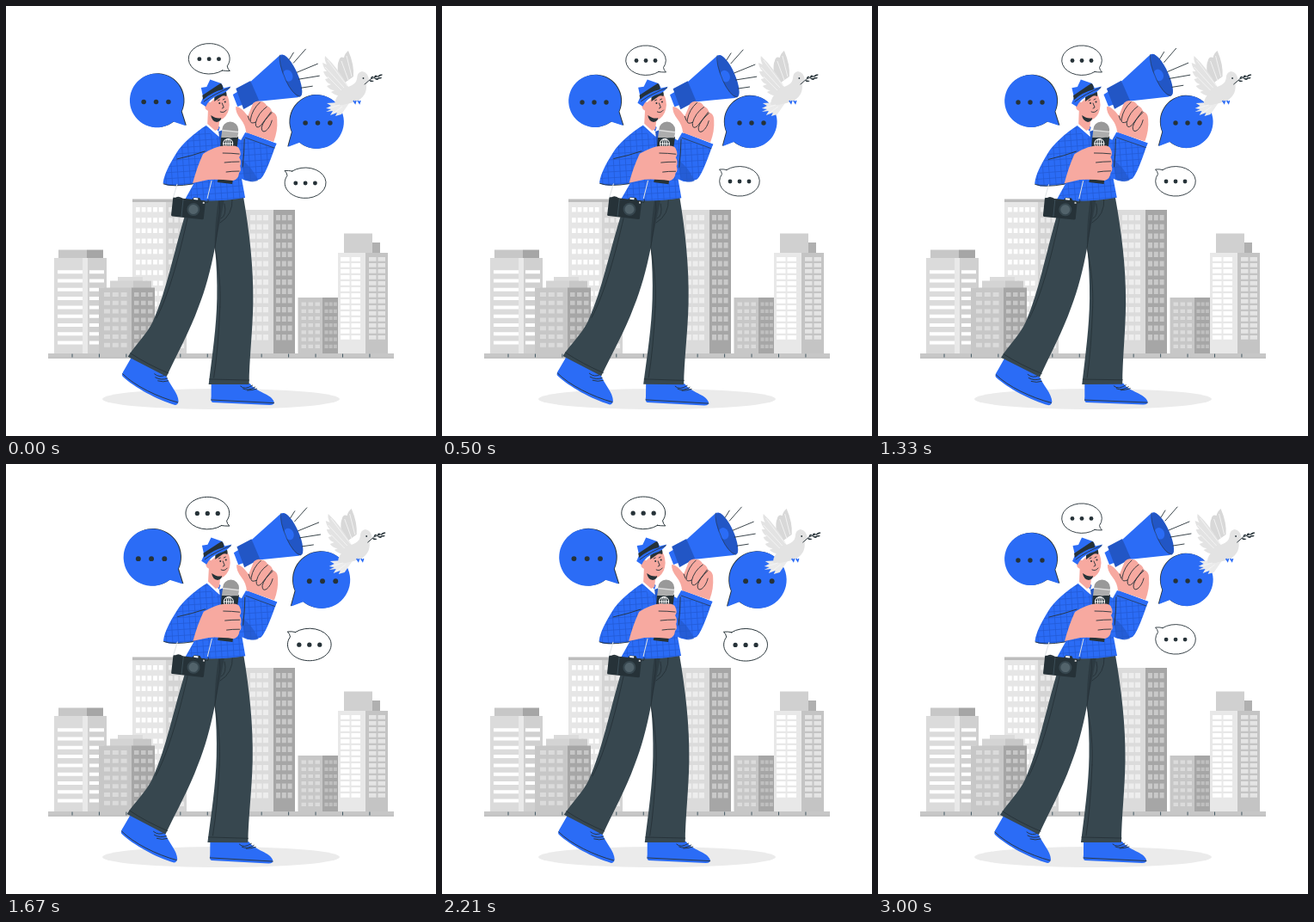
Write an HTML page that moves like this. It is 500x500 px and loops after 3040 ms.

```html
<!DOCTYPE html>
<html lang="en">
<head>
<meta charset="utf-8">
<title>Reporter with megaphone</title>
<style>
html, body { margin: 0; height: 100%; overflow: hidden; background: #fff }
svg { display: block; width: 100vw; height: 100vh }
.ink { fill: none; stroke: #263238; stroke-width: .9; stroke-linecap: round; stroke-linejoin: round }
.blue { fill: #2b6cf6 }
.navy { fill: #2256c5 }
.dark { fill: #263238 }
.skin { fill: #f7a9a0 }
</style>
</head>
<body>
<svg viewBox="0 0 500 500">
  <defs>
    <pattern id="plaid" width="7" height="7" patternUnits="userSpaceOnUse" patternTransform="rotate(-4)">
      <rect width="7" height="7" fill="#2b6cf6"/>
      <path d="M0 3.5H7M3.5 0V7" stroke="#225bd6" stroke-width=".8"/>
    </pattern>
  </defs>
  <g id="city"></g>
  <ellipse cx="250" cy="457" rx="138" ry="12" fill="#ebebeb"/>
  <g id="bubbles"></g>

  <g id="bird" fill="#e3e3e3">
    <path d="M404 82Q405 68 398 52Q394 55 393 60Q388 58 387 64Q385 67 386 78L390 92Z" fill="#d8d8d8"/>
    <path d="M388 112L373 113L378 116L372 119L378 120L372 123L380 122L377 127L385 124L383 128L390 126L399 113Z" fill="#ebebeb"/>
    <path d="M398 94Q386 72 371 58Q370 63 373 68L368 66Q369 72 373 76L369 76Q371 82 375 84L371 85Q373 90 378 91L373 93Q377 98 382 98L378 100Q383 104 386 104Q381 111 383 115Q393 116 407 111Q420 105 419 92L422 86Q421 77 414 76Q408 77 408 85Q407 91 398 94Z"/>
    <path d="M397 93L374 63M393 95L371 71M390 98L374 82M402 82L396 58M398 86L390 64M388 115L375 119M391 117L380 125" fill="none" stroke="#f5f5f5" stroke-width=".9"/>
    <path d="M404 110l2 3 1-3M409 110l2 3 1-3" fill="none" stroke="#2b6cf6" stroke-width="1.500"/>
    <circle cx="415.500" cy="84" r=".9" class="dark"/>
    <path d="M417 91L424 85L437 80" class="ink"/>
    <path d="M424 85Q424 81 428 82ZM428 84Q428 79 432 81ZM428 84Q432 88 434 84ZM432 83Q434 78 438 80ZM432 83Q436 86 437 83ZM422 86Q424 90 428 87Z" class="dark"/>
  </g>

  <g id="man">
    <!-- shoes -->
    <path class="blue" d="M146 409L186 429C190 440 201 450 201 460Q200 464 197 464C176 458 150 444 136 431Q134 429 138 423Z"/>
    <path class="blue" d="M239 439H284C291 449 309 451 312 460Q313 464 307 464L241 461Q238 461 239 454Z"/>
    <path class="ink" d="M136 428C150 442 177 455 200 461M239 458L312 461.500"/>
    <path class="ink" stroke-width="1.500" d="M173 428Q179 433 186 429M174 432Q181 436 188 433M177 436Q183 438 189 436M273 442Q278 447 287 441M276 445Q282 448 290 443M281 447Q286 447 292 445"/>
    <!-- trousers -->
    <path fill="#37474f" d="M210 228L276 222C283 262 288 303 287.500 345C287 380 283 412 283 440H236C240 407 245 373 245.500 340Q246 310 243 281C238 307 232 330 224 350C214 378 199 405 187 431L142 408C151 394 164 382 171 367C187 331 195 286 209 240Z"/>
    <path class="ink" d="M145 404Q165 417 189 427M237 434L283 435M211 247C203 284 190 336 175 363M248 227Q250 238 247 250L243 281C248 305 250 331 249 350M263 224Q264 243 249 252M254 230Q257 244 250 247M249 350Q247 400 242 432"/>
    <path d="M247 224L254 224L246 265L243 281Q242 260 247 224Z" class="dark" opacity=".55"/>
    <!-- shirt -->
    <path fill="url(#plaid)" d="M234 138C218 148 204 161 198 171C190 184 184 195 182.500 206Q186 210 197 209L218 207L208 225Q241 229 278 223L274 201Q284 207 296 201Q302 196 314 160L278 147L273 156L247 140Z"/>
    <path d="M273 178L277 200Q284 207 293 203Q287 188 273 178Z" class="navy" opacity=".65"/>
    <path class="ink" d="M199 178Q217 174 231 169M277 154Q277 171 275 187M218 206L221 195M183 207Q194 211 217 207"/>
    <path d="M276 154L280 147L314.500 160L312 165Z" class="blue"/>
    <path d="M278 153L312 165" class="ink" style="stroke-width:.7"/>
    <path d="M231 137.500L236 134L247 146L250 136L254 140L252 154L246 151Z" fill="#fff"/>
    <path d="M232 139L246 151L243 156Z" class="blue"/>
    <path d="M247 146L252 144L254 158L249 164Z" class="navy"/>
    <!-- head -->
    <path class="skin" d="M235 114L253 99Q259 104 259.500 115Q259 126 252 131L248 133L247 143L243 145L234 137Z"/>
    <path d="M238 127Q245 132 250 130Q250 134 245 135Q239 134 238 127ZM242 106L254 98Q257 100 256 105Q252 103 249 106L242 111Z" class="dark"/>
    <path class="skin" d="M237 112Q231 110 231 116Q231 122 237 122Z"/>
    <path class="blue" d="M226.500 95L233 94L237 85.500L250 90L253 95.500L261 93.500Q257 101 246 104Q236 108 232 117L226 113L229 106Z"/>
    <path d="M228 104L249 90Q252 91 252 97Q239 100 229 109Z" class="dark"/>
    <path class="ink" d="M230 111Q242 102 260 95M246 110l2-1M252 109l2-1M251 113l2 5-2 1M249 123Q253 125 256 121"/>
    <circle cx="248" cy="113" r="1" class="dark"/><circle cx="254.500" cy="111.500" r="1" class="dark"/>
    <!-- microphone and lower hand -->
    <path d="M250 151L270 152L263 207L246 205Z" class="dark"/>
    <circle cx="260.500" cy="144" r="9.500" fill="#999"/>
    <path d="M251 145L270 147L269 153H250Z" fill="#adadad"/>
    <path d="M251 144.500L270 146.500" stroke="#ddd" stroke-width="1.400"/>
    <g fill="none" stroke="#fff" stroke-width="1"><circle cx="258" cy="160" r="5.500"/><ellipse cx="258" cy="160" rx="2.500" ry="5.500"/><path d="M252 160H264M258 154V166"/></g>
    <path class="skin" d="M229 172C237 167 250 161 258 163Q269 161 271 166Q274 172 271 176Q274 181 272 186Q274 191 271 194Q270 202 264 203Q246 201 235 202L217 206Q222 187 229 172Z"/>
    <path class="ink" d="M271 172Q262 171 252 171M271 181Q262 181 254 182M271 192Q262 192 256 193M246 204L258 205"/>
    <!-- megaphone -->
    <path class="blue" d="M263.500 103L270 99L277 114L269 117Z"/>
    <path class="blue" d="M284 88L318 57Q324 53 334 72Q345 94 343.500 103L339 106L292 111Z"/>
    <path class="navy" d="M267 96L284 87L294 110L276 120Z"/>
    <ellipse cx="331" cy="81" rx="8" ry="26.500" transform="rotate(-24 331 81)" class="navy"/>
    <ellipse cx="327.500" cy="81" rx="5.500" ry="7" transform="rotate(-24 327 81)" class="blue"/>
    <path class="ink" d="M329 62L334 54M334 66L348 50M338 77L362 67M340 85L364 81M343 95L356 93" stroke-width=".8"/>
    <path class="ink" d="M318 57Q316 65 325 86Q333 103 341 105" opacity=".6"/>
    <!-- raised hand -->
    <path class="skin" d="M267 117Q272 116 281 128L287 113Q291 109 296 111Q300 111 303 116Q308 118 309 123Q315 125 315 132Q316 145 311 158L279 147Q278 138 273 132Q266 123 267 117Z"/>
    <path class="ink" d="M295 112Q286 120 284 132Q283 138 290 135M303 117Q293 124 290 136Q290 144 296 139L308 123M309 124Q299 133 297 141Q297 148 302 145Q307 141 309 133M281 128L283 133"/>
    <!-- camera -->
    <path d="M194 224L199 207M234 224L239 203" fill="none" stroke="#dfe3e5"/>
    <g transform="rotate(6 212 235)" class="dark">
      <rect x="193" y="224.500" width="38" height="22" rx="1.500"/>
      <path d="M195 225Q199 221 205 225ZM215 225L217 222H224L226 225Z"/>
      <rect x="217" y="222.500" width="5" height="2" fill="#fff"/>
      <circle cx="218" cy="236" r="7.500" fill="#37474f"/>
      <circle cx="218" cy="236" r="5.500" fill="#52636b"/>
      <path d="M205 225V246" stroke="#455a64" stroke-width=".7"/>
      <rect x="228" y="226" width="2" height="2" fill="#ccc"/>
    </g>
    <path d="M231 228Q236 231 235 225" class="ink"/>
  </g>
</svg>
<script>
const $ = id => document.getElementById(id);
const box = (x, y, x2, y2, fill) => `<path d="M${x} ${y}H${x2}V${y2}H${x}Z" fill="${fill}"/>`;

// rows and columns of equal windows
function panes(x, y, cols, dx, w, rows, dy, h, fill) {
  let d = '';
  for (let r = 0; r < rows; r++)
    for (let c = 0; c < cols; c++) d += `M${x + c * dx} ${y + r * dy}h${w}v${h}h${-w}z`;
  return `<path d="${d}" fill="${fill}"/>`;
}

let ticks = '';
for (let i = 0; i < 12; i++) ticks += `M${77 + i * 31.45} 404.500v4`;

$('city').innerHTML =
  box(147, 225, 210, 404, '#e6e6e6') + box(186, 228, 210, 404, '#d4d4d4') + box(147, 224.5, 210, 228, '#bdbdbd') +
  panes(151, 234, 5, 6.7, 4.7, 14, 12.2, 5.5, '#fff') + panes(189, 234, 3, 6.7, 4.7, 14, 12.2, 5.5, '#ebebeb') +
  box(61, 283.5, 94, 293, '#c7c7c7') + box(94, 283.5, 113, 293, '#a6a6a6') +
  box(56, 293, 117, 404, '#dbdbdb') + box(89, 293, 95, 404, '#e9e9e9') + box(95, 293, 117, 404, '#d0d0d0') +
  panes(60, 307.2, 1, 0, 29, 9, 10.3, 4, '#fff') + panes(97, 307.2, 1, 0, 17, 9, 10.3, 4, '#fff') +
  box(130, 315, 159, 320, '#dbdbdb') + box(121, 319.5, 148, 328, '#d4d4d4') + box(148, 319.5, 169, 328, '#c7c7c7') +
  box(108, 327.5, 146, 404, '#c7c7c7') + box(146, 327.5, 173, 404, '#a6a6a6') +
  panes(114, 333, 3, 9.8, 7, 7, 9.8, 5, '#dbdbdb') + panes(149, 333, 3, 8, 5.5, 7, 9.8, 5, '#c7c7c7') +
  box(274, 237, 311, 404, '#dbdbdb') + box(311, 237, 336, 404, '#a6a6a6') +
  panes(284, 243, 3, 7.5, 6, 14, 10.7, 6.3, '#ededed') + panes(314, 243, 3, 6.8, 5, 14, 10.7, 6.3, '#c9c9c9') +
  box(339.5, 339, 368, 404, '#c7c7c7') + box(368, 339, 386, 404, '#a6a6a6') +
  panes(343.5, 344.5, 3, 8, 5.5, 7, 8.2, 4.2, '#dbdbdb') + panes(370.5, 344.5, 3, 5.2, 4, 7, 8.2, 4.2, '#bfbfbf') +
  box(409, 275, 435, 287, '#b0b0b0') + box(393, 264.5, 426, 287, '#d0d0d0') +
  box(386, 287, 418, 404, '#e8e8e8') + box(418, 287, 444, 404, '#c4c4c4') +
  panes(389, 292, 2, 12.5, 10.5, 14, 7, 4.7, '#fff') + panes(422, 292, 2, 10.5, 8.5, 14, 7, 4.7, '#e4e4e4') +
  box(49, 404, 451, 409.5, '#c7c7c7') +
  `<path d="M49 409.200H451" stroke="#aaa" stroke-width=".7"/><path d="${ticks}" stroke="#455a64" stroke-width="1"/>`;

const dots = (x, y, gap, r) =>
  [-gap, 0, gap].map(d => `<circle cx="${x + d}" cy="${y}" r="${r}" class="dark"/>`).join('');
const bubble = (d, x, y, gap, r, fill, shift = 0) =>
  (shift ? `<path d="${d}" class="dark" transform="translate(${shift} -.3)"/>` : '') +
  `<path d="${d}" fill="${fill}"${shift ? '' : ' class="ink" style="fill:#fff"'}/>` + dots(x, y, gap, r);

$('bubbles').innerHTML =
  bubble('M196.500 134.500A30.500 30.500 0 1 1 205.500 123L210.500 139Z', 177, 112, 14, 2.7, '#2b6cf6', .9) +
  bubble('M339.500 158A30.500 30.500 0 1 0 331 146.500L326.500 163Z', 360, 136, 14, 2.7, '#2b6cf6', -.8) +
  bubble('M252 76.500A23.300 17.300 0 1 1 257.500 71.500Q258 75 260.500 77Q255 77 252 76.500Z', 237, 63.500, 11, 2.4, '#fff') +
  bubble('M331 190.500A23.300 17.300 0 1 1 325.500 195.500Q325 192 322.500 190Q327 189.500 331 190.500Z', 346, 204, 11, 2.4, '#fff');

// linear interpolation through [position, value] stops
function track(p, stops) {
  const i = Math.max(1, stops.findIndex(s => s[0] >= p));
  const [a, u] = stops[i - 1], [b, v] = stops[i];
  return u + (v - u) * (p - a) / (b - a);
}
const sway = [[0, 0], [.25, 1], [.75, -1], [1, 0]];
const beat = [[0, 1], [.1, 1.1], [.3, 1], [.39, 1], [.49, 1.1], [.59, 1], [1, 1]];
const shake = [0, -1, 2, -4, 4, -4, 4, -4, 2, -1, 0].map((v, i) => [i / 10, v]);

const LOOP = 3040, CYCLE = LOOP / 2;

function draw() {
  const t = performance.now() % LOOP;
  const phase = (t + 40) % CYCLE / CYCLE;
  $('man').setAttribute('transform', `rotate(${track(phase, sway)} 249 257)`);
  $('bubbles').setAttribute('transform',
    `translate(268 133) scale(${track(phase, beat)}) translate(-268 -133)`);
  $('bird').setAttribute('transform', `translate(${track(Math.max(0, t - 460) / 3000, shake)})`);
  requestAnimationFrame(draw);
}
draw();
</script>
</body>
</html>
```
